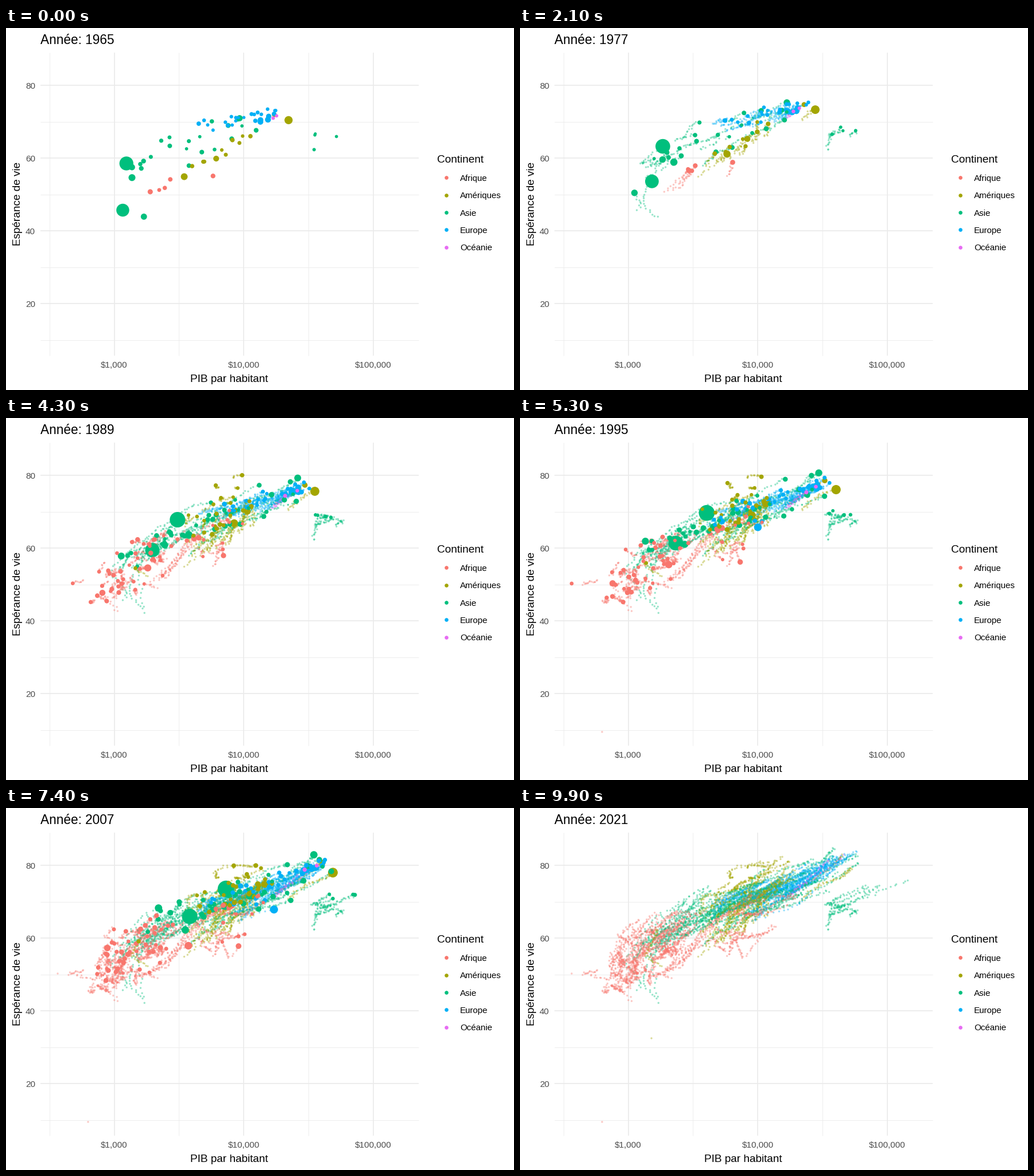
Animation of 885x632 px, one loop 10000 ms. Source, as a matplotlib script:

```python
import numpy as np
import matplotlib.pyplot as plt
from matplotlib.animation import FuncAnimation

W, H, DPI = 885, 632, 128
FRAMES, FIRST, LAST, END = 100, 1965, 2018, 2021
AF, AM, AS, EU, OC = "#F8766D", "#A3A500", "#00BF7D", "#00B0F6", "#E76BF3"
YEARS = np.arange(FIRST, LAST + 1)

rng = np.random.default_rng(7)
tracks = []


def glide(points, start):
    """Yearly positions through points spaced evenly from start to LAST."""
    pts = np.array(points, float)
    when = np.linspace(start, LAST, len(pts))
    return np.column_stack([np.interp(YEARS, when, axis) for axis in pts.T])


def add(color, r, path, start, dip=None):
    path = path + rng.normal(0, (2.0, 1.1), path.shape)
    path[YEARS < start] = np.nan
    if dip:
        path[dip[0] - FIRST] = dip[1]
    tracks.append((color, r, path))


def country(color, r, *points, start=FIRST, dip=None):
    add(color, r, glide(points, start), start, dip)


def cloud(color, n, start, poor, rich, spread, radii):
    """n countries ranked between a moving poor end and a moving rich end."""
    low, high = glide(poor, start), glide(rich, start)
    age = (YEARS - FIRST) / (LAST - FIRST)
    for k in range(n):
        rank = (k + rng.random()) / n
        offset = np.clip(rng.normal(size=2), -1.7, 1.7) * spread
        phase = rng.random(2)
        sway = 0.35 * np.sin(2 * np.pi * (1.3 * age[:, None] + phase)) * spread
        path = low + (high - low) * rank + offset + sway
        path[:, 1] = np.maximum(path[:, 1], 72)
        add(color, rng.uniform(*radii), path, start)


cloud(AS, 20, FIRST, [(215, 245), (285, 208), (350, 180)],
      [(420, 170), (515, 122), (590, 85)], (22, 17), (3, 4.8))
cloud(AS, 17, 1980, [(190, 272), (230, 212), (275, 165)],
      [(410, 155), (460, 140), (530, 128)], (15, 13), (3, 4.6))
cloud(AS, 3, FIRST, [(538, 185), (555, 174), (532, 170), (565, 160), (600, 145)],
      [(555, 185), (575, 172), (540, 165), (570, 150), (610, 120)], (14, 9), (2.8, 3.4))
cloud(AM, 9, FIRST, [(322, 240), (355, 192), (400, 150)],
      [(440, 185), (448, 152), (490, 110)], (13, 10), (3, 4.4))
cloud(AM, 16, 1980, [(305, 215), (330, 175), (360, 155)],
      [(400, 125), (415, 122), (465, 104)], (24, 13), (2.8, 3.9))
cloud(AF, 3, FIRST, [(265, 290), (325, 205), (395, 150)],
      [(300, 250), (345, 190), (440, 135)], (8, 8), (3.5, 4.6))
cloud(AF, 40, 1980, [(172, 302), (165, 298), (172, 240)],
      [(290, 215), (262, 225), (305, 200)], (17, 23), (3, 4.2))
cloud(AF, 9, 1980, [(335, 235), (365, 245), (390, 220)],
      [(380, 165), (425, 150), (495, 140)], (14, 17), (2.7, 3.6))
cloud(EU, 21, FIRST, [(342, 171), (388, 158), (432, 132)],
      [(482, 145), (538, 114), (595, 77)], (11, 6), (3, 4.4))
cloud(EU, 4, FIRST, [(440, 160), (500, 127), (538, 86)],
      [(460, 153), (515, 118), (560, 90)], (4, 3), (4.8, 5.8))
cloud(EU, 8, 1990, [(300, 188), (325, 165), (350, 148)],
      [(430, 170), (450, 158), (500, 125)], (12, 8), (3, 4))
cloud(OC, 2, FIRST, [(461, 158), (488, 134), (535, 92)],
      [(472, 152), (512, 124), (571, 82)], (2, 2), (2.8, 3.6))

# Countries that stand out by size or route
country(AS, 13.5, (209, 237), (266, 191), (345, 153), (445, 122))
country(AS, 12.5, (206, 318), (236, 247), (283, 205), (372, 165))
country(AS, 6.7, (219, 262), (295, 219), (357, 181), (425, 158))
country(AS, 6, (237, 332), (181, 271), (233, 193), (315, 142))
country(AS, 6, (407, 158), (495, 116), (531, 88), (545, 71))
country(AS, 6, (221, 244), (263, 222), (297, 221), (340, 198))
country(AS, 3.3, (535, 211), (545, 175), (570, 168), (676, 126))
country(AS, 3.6, (239, 340), (227, 234), (246, 217), (258, 208), start=1980)
country(AM, 7.9, (490, 161), (523, 134), (562, 119), (577, 105))
country(AM, 6.6, (312, 260), (383, 201), (414, 155), (455, 132))
country(AM, 5.6, (365, 228), (412, 178), (431, 139), (480, 125))
country(AM, 4.6, (466, 152), (506, 126), (543, 102), (562, 82))
country(AM, 3.4, (245, 276), (217, 257), (229, 235), (238, 212),
        start=1980, dip=(2010, (229, 402)))
country(AF, 5, (251, 287), (316, 229), (370, 176), (425, 162))
country(AF, 4.6, (362, 258), (373, 224), (388, 262), (440, 205))
country(AF, 6.2, (239, 261), (250, 262), (310, 245), (365, 215), start=1980)
country(AF, 5.3, (196, 338), (160, 295), (170, 252), (225, 190), start=1980)
country(AF, 3.3, (136, 284), (110, 290), (155, 300), (172, 220), start=1980,
        dip=(1995, (90, 289)))
country(AF, 3.4, (171, 251), (160, 275), (175, 240), (220, 200), start=1980,
        dip=(1994, (143, 548)))
country(EU, 6.5, (425, 180), (405, 197), (480, 172), (510, 145), start=1990)
country(EU, 5, (347, 175), (352, 186), (405, 160), (415, 150), start=1990)

tracks.sort(key=lambda t: -t[1])   # small dots end up on top
colors = np.array([t[0] for t in tracks])
radii = np.array([t[1] for t in tracks])
paths = np.array([t[2] for t in tracks])

# Trail marks, ordered by year and mixed within it
mix = rng.permutation(len(tracks))
trail_xy = paths[mix].transpose(1, 0, 2).reshape(-1, 2)
trail_color = np.tile(colors[mix], len(YEARS))
trail_year = np.repeat(YEARS, len(tracks))
known = ~np.isnan(trail_xy[:, 0])
trail_xy, trail_color, trail_year = trail_xy[known], trail_color[known], trail_year[known]


def area(radius):
    return (2 * np.asarray(radius) * 72 / DPI) ** 2


fig = plt.figure(figsize=(W / DPI, H / DPI), dpi=DPI, facecolor="white")
ax = fig.add_axes([0, 0, 1, 1])
ax.set_xlim(0, W)
ax.set_ylim(H, 0)
ax.axis("off")


def label(x, y, text, px, color="black", **kw):
    return ax.text(x, y, text, fontsize=px * 72 / DPI, color=color,
                   family="Liberation Sans", va="baseline", **kw)


def grid(xs, ys, px):
    style = dict(colors="#EBEBEB", linewidths=px * 72 / DPI, zorder=0)
    ax.vlines(xs, 43, 572, **style)
    ax.hlines(ys, 60, 719, **style)


DECADE, STEP = 225.5, 127.1   # stage pixels per axis tick
x_ticks = 188.5 + DECADE * np.arange(3)
y_ticks = 100.2 + STEP * np.arange(4)
grid(x_ticks - DECADE / 2, y_ticks + STEP / 2, 0.9)
grid(x_ticks, y_ticks, 1.7)

for k, x in enumerate(x_ticks):
    label(x, 593, f"${10 ** (k + 3):,}", 15.2, "#4D4D4D", ha="center")
for k, y in enumerate(y_ticks):
    label(51, y + 5.8, str(80 - 20 * k), 15.2, "#4D4D4D", ha="right")
label(389, 618.5, "PIB par habitant", 19, ha="center")
label(25, 307, "Espérance de vie", 19, ha="center", rotation=90,
      rotation_mode="anchor")

label(751, 235, "Continent", 19)
names = ("Afrique", "Amériques", "Asie", "Europe", "Océanie")
for k, (name, color) in enumerate(zip(names, (AF, AM, AS, EU, OC))):
    y = 261.4 + 30.3 * k
    ax.scatter(766.9, y, s=area(3.3), c=color, linewidths=0)
    label(791, y + 5.8, name, 15)

title = label(60, 28, "", 22.6)
trail = ax.scatter([], [], s=area(1.7), linewidths=0, alpha=0.4, zorder=2)
dots = ax.scatter([], [], linewidths=0, zorder=3)

# Each year lands on a whole frame; frames between are tweened
year_frames = np.round(np.arange(END - FIRST + 1) * (FRAMES - 1) / (END - FIRST))


def update(frame):
    shown = FIRST + round((END - FIRST) * frame / (FRAMES - 1))
    title.set_text(f"Année: {shown}")
    t = np.interp(frame, year_frames, np.arange(FIRST, END + 1))

    past = trail_year < t
    trail.set_visible(bool(past.any()))
    trail.set_offsets(trail_xy[past])
    trail.set_facecolor(trail_color[past])

    dots.set_visible(bool(t <= LAST))
    if t <= LAST:
        i = int(t - FIRST)
        f = t - FIRST - i
        j = min(i + 1, len(YEARS) - 1)
        pos = paths[:, i] if f == 0 else paths[:, i] * (1 - f) + paths[:, j] * f
        on = ~np.isnan(pos[:, 0])
        growth = 0.9 + 0.22 * (t - FIRST) / (LAST - FIRST)
        dots.set_offsets(pos[on])
        dots.set_sizes(area(radii[on] * growth))
        dots.set_facecolor(colors[on])
    return title, trail, dots


anim = FuncAnimation(fig, update, frames=FRAMES, interval=100,
                     repeat=True, repeat_delay=0)
plt.show()
```
